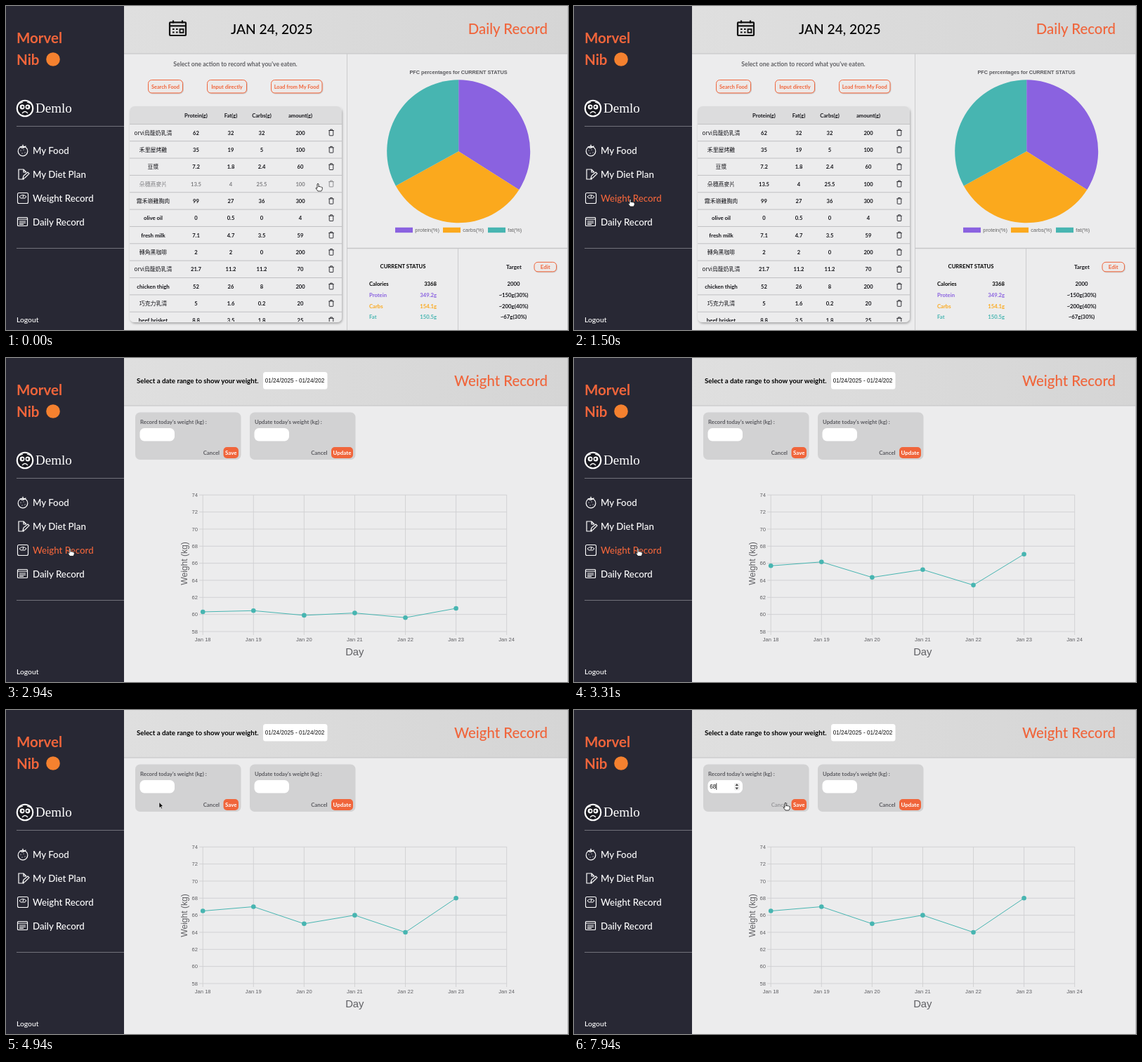
Animation, 800 px wide and 462 px high, one loop 8 s. Source, as an HTML page:

```html
<!DOCTYPE html>
<html lang="en">
<head>
<meta charset="utf-8">
<title>Diet tracker</title>
<style>
html, body { margin: 0; width: 100%; height: 100%; overflow: hidden; background: #ececed; }
svg { display: block; width: 800px; height: 462px; }
text { white-space: pre; }
.ui, .note { font-family: Lato, 'Noto Sans CJK TC', 'Noto Sans CJK', sans-serif; }
.ui { font-weight: 500; }
.note { font-weight: 700; }
.cjk { font-family: 'Noto Sans CJK TC', 'Noto Sans CJK', sans-serif; font-weight: 400; }
.chart { font-family: 'Liberation Sans', Arial, sans-serif; }
.bold { font-family: 'Liberation Sans', Arial, sans-serif; font-weight: 700; }
.serif { font-family: 'Liberation Serif', serif; }
</style>
</head>
<body>
<svg id="stage" viewBox="0 0 800 462">
  <defs>
    <linearGradient id="bar"><stop stop-color="#dfdfdf"/><stop offset="1" stop-color="#d5d5d5"/></linearGradient>
    <clipPath id="tableClip"><rect x="176" y="143" width="302" height="307" rx="7"/></clipPath>
    <filter id="shadow" x="-10%" y="-10%" width="120%" height="130%">
      <feDropShadow dx="1" dy="2" stdDeviation="1.6" flood-color="#000" flood-opacity=".28"/>
    </filter>
    <filter id="softShadow" x="-10%" y="-20%" width="120%" height="150%">
      <feDropShadow dx=".6" dy=".8" stdDeviation=".6" flood-color="#000" flood-opacity=".22"/>
    </filter>
  </defs>
</svg>
<script>
const LOOP = 8000, SWITCH = 2865, FOCUS = 5500;
const ORANGE = '#f0653b', TEAL = '#47b5b1', PURPLE = '#8a62e0', YELLOW = '#fba91d', INK = '#15151a';
const stage = document.getElementById('stage');

const text = (x, y, str, size, fill = INK, cls = 'note', anchor = 'start', extra = '') =>
  `<text x="${x}" y="${y}" class="${cls}" font-size="${size}" fill="${fill}" text-anchor="${anchor}" ${extra}>${str}</text>`;
const mid = (x, y, str, size, fill, cls, extra) => text(x, y, str, size, fill, cls, 'middle', extra);
const rect = (x, y, w, h, fill, r = 0, extra = '') =>
  `<rect x="${x}" y="${y}" width="${w}" height="${h}" rx="${r}" fill="${fill}" ${extra}/>`;
const path = (d, stroke, width = 1, fill = 'none', extra = '') =>
  `<path d="${d}" stroke="${stroke}" stroke-width="${width}" fill="${fill}" ${extra}/>`;
const circle = (x, y, r, fill, extra = '') => `<circle cx="${x}" cy="${y}" r="${r}" fill="${fill}" ${extra}/>`;
const group = (id, body, extra = '') => `<g id="${id}" ${extra}>${body}</g>`;

// Sidebar
const NAV = ['My Food', 'My Diet Plan', 'Weight Record', 'Daily Record'];
const navY = i => 206 + 34 * i;
const navIcons = [
  circle(24, 207, 6.8, 'none', 'stroke="#fff" stroke-width="1.2"') +
    path('M20 201q4 3 8-1M24 201v-3M21 206h.1M25 205h.1M23 210h.1M27 209h.1', '#fff', 1.2, 'none', 'stroke-linecap="round"'),
  path('M26 247h-8v-14h7l4 4M25 233v4h4M24 246l1-4 6-5 2 2-6 6z', '#fff', 1.2),
  rect(16.5, 266.5, 15, 15, 'none', 2, 'stroke="#fff" stroke-width="1.1"') +
    path('M19 272q5-5 10 0l-2 2h-6zM24 273l1-3', '#fff', 1),
  rect(16.5, 301.5, 14, 12, 'none', 1, 'stroke="#fff" stroke-width="1.2"') +
    path('M16 304h15M19 307h9M19 309.2h9M19 311.4h6', '#fff', 1.1)
];
const sidebar = rect(0, 0, 168, 462, '#282834') +
  text(15, 53, 'Morvel', 20.5, ORANGE) + text(15, 84, 'Nib', 20.5, ORANGE) + circle(67, 76, 9.8, '#f5812f') +
  circle(27, 146, 12.3, '#fff') + circle(27, 146, 10.2, '#17171d') +
  circle(23, 144, 3.4, '#fff') + circle(31, 144, 3.4, '#fff') +
  circle(23.5, 144, 1.4, '#17171d') + circle(30.5, 144, 1.4, '#17171d') +
  path('M23 153q4-5 8 0M19 139l5-2M30 137l5 2', '#fff', 1.3) +
  text(42, 152, 'Demlo', 19, '#fff', 'serif') +
  path('M15 171.5H168M15 345.5H168', '#71717a') +
  NAV.map((name, i) => navIcons[i] + text(38, navY(i) + 4.7, name, 13.3, '#fff', 'ui', 'start', `id="nav${i}"`)).join('') +
  text(15, 451, 'Logout', 10.3, '#fff', 'ui');

const header = title => rect(168, 0, 632, 68, 'url(#bar)') + path('M168 68H800', '#c3c3c4') +
  text(771, 40, title, 20.4, ORANGE, 'ui', 'end');

// Daily page
const ROWS = `orvi烏龍奶乳清|62|32|32|200
禾里屋烤雞|35|19|5|100
豆漿|7.2|1.8|2.4|60
朵穗燕麥片|13.5|4|25.5|100
霧禾嶺雞胸肉|99|27|36|300
olive oil|0|0.5|0|4
fresh milk|7.1|4.7|3.5|59
轉角黑咖啡|2|2|0|200
orvi烏龍奶乳清|21.7|11.2|11.2|70
chicken thigh|52|26|8|200
巧克力乳清|5|1.6|0.2|20
beef brisket|8.8|3.5|1.8|25`.split('\n').map(row => row.split('|'));
const COLUMNS = [209.5, 270.5, 320, 364, 419];
const PITCH = 24.35, rowY = i => 181 + PITCH * i;
const fontOf = str => /[一-龥]/.test(str) ? 'cjk' : 'note';
const cells = (list, y) => list.map((s, i) => mid(COLUMNS[i], y, s, i ? 7.6 : 7.9, INK, fontOf(s))).join('');
const trash = y => path(`M459.3 ${y - 3.5}h7.4M461.6 ${y - 3.8}v-1.2h2.8v1.2M460.2 ${y - 3.5}v6.6q0 .7 .7 .7h4.2q.7 0 .7-.7v-6.6`, INK, .85);

const table = rect(176, 143, 302, 308, '#ececed', 7, 'filter="url(#shadow)"') +
  `<g clip-path="url(#tableClip)">` + rect(176, 143, 302, 25.5, '#dcdcdd') + path('M176 168.5H478', '#c2c2c4') +
  cells(['', 'Protein(g)', 'Fat(g)', 'Carbs(g)', 'amount(g)'], 159) +
  ROWS.map((row, i) => group('row' + i, cells(row, rowY(i) + 2.5) + trash(rowY(i))) +
    path(`M176 ${rowY(i) + 11.7}H478`, '#bcbcbf', .9)).join('') + '</g>';

const button = (x, y, w, h, label, size) =>
  rect(x, y, w, h, '#ede9e8', 5, `stroke="${ORANGE}" stroke-width="1" filter="url(#softShadow)"`) +
  mid(x + w / 2, y + h / 2 + 2.8, label, size, ORANGE);

const onPie = deg => {
  const a = (deg - 90) * Math.PI / 180;
  return `${644.2 + 102 * Math.cos(a)} ${207.3 + 102 * Math.sin(a)}`;
};
const slice = (from, to, fill) =>
  `<path d="M644.2 207.3L${onPie(from * 3.6)}A102 102 0 0 1 ${onPie(to * 3.6)}Z" fill="${fill}"/>`;
const legend = (x, fill, label) => rect(x, 315.8, 25, 7.4, fill) + text(x + 28.3, 322.3, label, 7.5, '#666', 'chart');
const stat = (y, label, value, target, fill) => text(517, y, label, 7.7, fill) +
  text(613, y, value, 7.7, fill, 'note', 'end') + mid(722.5, y, target, 7.8);

const calendar = rect(233, 23.3, 23, 18.7, 'none', 1, 'stroke="#111" stroke-width="2.2"') +
  path('M233 28.3H256M238 20.5v4M251 20.5v4', '#111', 2.2) +
  path('M237 33h2.6M242 33h2.6M237 37.5h2.6M242 37.5h2.6', '#111', 2.2) +
  rect(247.5, 33, 5, 5, 'none', 0, 'stroke="#111" stroke-width="1.8"');

const daily = header('Daily Record') + calendar +
  text(320, 40, 'JAN 24, 2025', 19.2, '#000', 'ui') +
  mid(326.5, 85.5, "Select one action to record what you've eaten.", 8.6, '#626266') +
  button(202.5, 105.5, 49, 18.5, 'Search Food', 7.3) +
  button(286.5, 105.5, 56, 18.5, 'Input directly', 7.5) +
  button(377.5, 105.5, 72.5, 18.5, 'Load from My Food', 7.4) + table +
  path('M485.5 68V462M643.5 346V462', '#cbcbcd') + path('M485 345.5H800', '#c6c6c8', 1.6) +
  mid(644, 97, 'PFC percentages for CURRENT STATUS', 7.3, '#58585c', 'bold') +
  slice(0, 34, PURPLE) + slice(34, 67, YELLOW) + slice(67, 100, TEAL) +
  legend(554, PURPLE, 'protein(%)') + legend(622, YELLOW, 'carbs(%)') + legend(686, TEAL, 'fat(%)') +
  mid(565, 374.3, 'CURRENT STATUS', 7.7, '#000') + mid(723, 374.5, 'Target', 7.9) +
  button(752, 365.3, 31.5, 13.5, 'Edit', 7.9) +
  stat(399, 'Calories', '3368', '2000', '#000') + stat(415, 'Protein', '349.2g', '~150g(30%)', PURPLE) +
  stat(430.5, 'Carbs', '154.1g', '~200g(40%)', YELLOW) + stat(446, 'Fat', '150.5g', '~67g(30%)', TEAL);

// Weight page
const WEIGHTS = [66.5, 67, 65, 66, 64, 68];
const BASE = 390, dayX = i => 280.2 + 72.08 * i, kgY = kg => BASE - (kg - 58) * 12.17;
const card = (x, verb, width) => rect(x, 77.5, 150.5, 67.5, '#d2d2d3', 7) +
  text(x + 7, 94, verb + " today's weight (kg) :", 7.8, '#5b5b60') +
  rect(x + 6.5, 100, 49.5, 18.5, '#fff', 6.5) +
  text(x + 141.5 - width, 138, 'Cancel', 7.8, '#5b5b60', 'note', 'end', `id="cancel${verb}"`) +
  rect(x + 147 - width, 127, width, 16, ORANGE, 5) +
  mid(x + 147 - width / 2, 138, verb === 'Record' ? 'Save' : verb, 7.9, '#fff');

let grid = '', ticks = '';
for (let i = 0; i < 7; i++) {
  grid += `M${dayX(i)} 195V395`;
  ticks += mid(dayX(i), 404, 'Jan ' + (18 + i), 7.6, '#606064', 'chart');
}
for (let kg = 58; kg <= 74; kg += 2) {
  grid += `M275 ${kgY(kg)}H712.7`;
  ticks += text(273, kgY(kg) + 2.7, kg, 7.6, '#606064', 'chart', 'end');
}

const weight = header('Weight Record') +
  text(186, 36, 'Select a date range to show your weight.', 9.7, '#000') + rect(366, 20, 91.5, 24.5, '#fff', 3.5) +
  text(368.7, 35, '01/24/2025 - 01/24/202', 8.2, '#111', 'chart') +
  card(184, 'Record', 21.5) + card(347, 'Update', 31) +
  group('spinner', rect(228, 104, 8, 10.5, '#eee', 1.5) +
    `<path d="M229.5 108l2.3-3 2.3 3zM229.5 110.5l2.3 3 2.3-3z" fill="#444"/>`) +
  text(193.3, 112, '', 8.2, '#111', 'chart', 'start', 'id="typed"') + rect(193.3, 104.3, .8, 9.6, '#111', 0, 'id="caret"') +
  path(grid, '#d0d0d2', .9) + ticks +
  mid(0, 0, 'Weight (kg)', 12.1, '#606064', 'chart', 'transform="translate(258 293) rotate(-90)"') +
  mid(496.3, 424, 'Day', 14.8, '#606064', 'chart') +
  path('', TEAL, 1, 'none', 'id="curve"') + WEIGHTS.map((_, i) => circle(dayX(i), BASE, 3.3, TEAL, `id="dot${i}"`)).join('');

const cursors =
  group('hand', path('M-1 1Q0-1 1 1V5L2 4 3.3 5 4.3 4.6 5.2 5.6 6.2 5.6V8.5L4.8 11H0L-3 7Q-3.2 5.5-1 7Z', '#111', .8, '#fff')) +
  group('arrow', path('M0 0V8.2L1.9 6.5 3.2 9.4 4.5 8.8 3.2 6H5.8Z', '#fff', .6, '#000')) +
  group('beam', path('M-1.5-5Q0-5 0-4V4Q0 5-1.5 5M1.5-5Q0-5 0-4M0 4Q0 5 1.5 5', '#333', .8));

stage.insertAdjacentHTML('beforeend', rect(0, 0, 800, 462, '#ececed') + group('daily', daily) + group('weight', weight) +
  path('M799.5 0V462', '#c4c4c6') + sidebar + cursors);

// Pointer stops: time, x, y
const STOPS = [[0, 444, 253], [100, 444, 253], [1150, 80, 275], [1600, 80, 275], [2200, 91, 271.5],
  [3600, 91, 271.5], [4500, 218, 131.5], [5050, 218, 131.5], [5450, 213, 109], [7300, 213, 109], [7940, 301, 132], [8000, 304, 132]];

function pointer(t) {
  const k = STOPS.findIndex(s => s[0] > t);
  const [t0, x0, y0] = STOPS[k - 1], [t1, x1, y1] = STOPS[k];
  const p = (t - t0) / (t1 - t0), e = p * p * (3 - 2 * p);
  return [x0 + (x1 - x0) * e, y0 + (y1 - y0) * e];
}

const parts = Object.fromEntries([...stage.querySelectorAll('[id]')].map(el => [el.id, el]));
const set = (id, name, value) => parts[id].setAttribute(name, value);
const show = (id, on) => { parts[id].style.display = on ? '' : 'none'; };
const inside = (x, y, l, t, r, b) => x >= l && x < r && y >= t && y < b;

function draw(t) {
  const [x, y] = pointer(t), onDaily = t < SWITCH;
  show('daily', onDaily);
  show('weight', !onDaily);

  const nav = NAV.findIndex((_, i) => inside(x, y, 14, navY(i) - 12, 128, navY(i) + 12));
  NAV.forEach((_, i) => set('nav' + i, 'fill', i === nav ? ORANGE : '#fff'));
  const row = onDaily && inside(x, y, 176, 168.5, 478, 451) ? Math.floor((y - 168.5) / PITCH) : -1;
  ROWS.forEach((_, i) => set('row' + i, 'opacity', i === row ? .5 : 1));
  const onCancel = !onDaily && inside(x, y, 279, 127, 306, 143);
  set('cancelRecord', 'fill', onCancel ? '#98989b' : '#5b5b60');

  const onInput = !onDaily && inside(x, y, 190, 100, 240, 118.5);
  const visible = t < 6300 || t > 7300;
  const hand = nav >= 0 || row >= 0 || onCancel;
  const kind = onInput ? 'beam' : hand ? 'hand' : 'arrow';
  for (const id of ['hand', 'arrow', 'beam']) {
    show(id, visible && id === kind);
    set(id, 'transform', `translate(${x} ${y})`);
  }

  const typed = t < 6760 ? '' : t < 6900 ? '6' : '68';
  const lastEdit = t < 6760 ? FOCUS : t < 6900 ? 6760 : 6900;
  parts.typed.textContent = typed;
  set('caret', 'x', 193.3 + typed.length * 4.56);
  show('caret', t >= FOCUS && (t - lastEdit) % 1000 < 500);
  show('spinner', t >= FOCUS || onInput);

  const grow = Math.min(1, Math.max(0, (t - SWITCH) / 1000));
  const rise = 1 - (1 - grow) ** 4;
  const heights = WEIGHTS.map(kg => BASE + (kgY(kg) - BASE) * rise);
  heights.forEach((h, i) => set('dot' + i, 'cy', h));
  set('curve', 'd', 'M' + heights.map((h, i) => `${dayX(i)} ${h}`).join('L'));
}

const start = performance.now();
function tick() {
  draw((performance.now() - start) % LOOP);
  requestAnimationFrame(tick);
}
tick();
</script>
</body>
</html>
```
